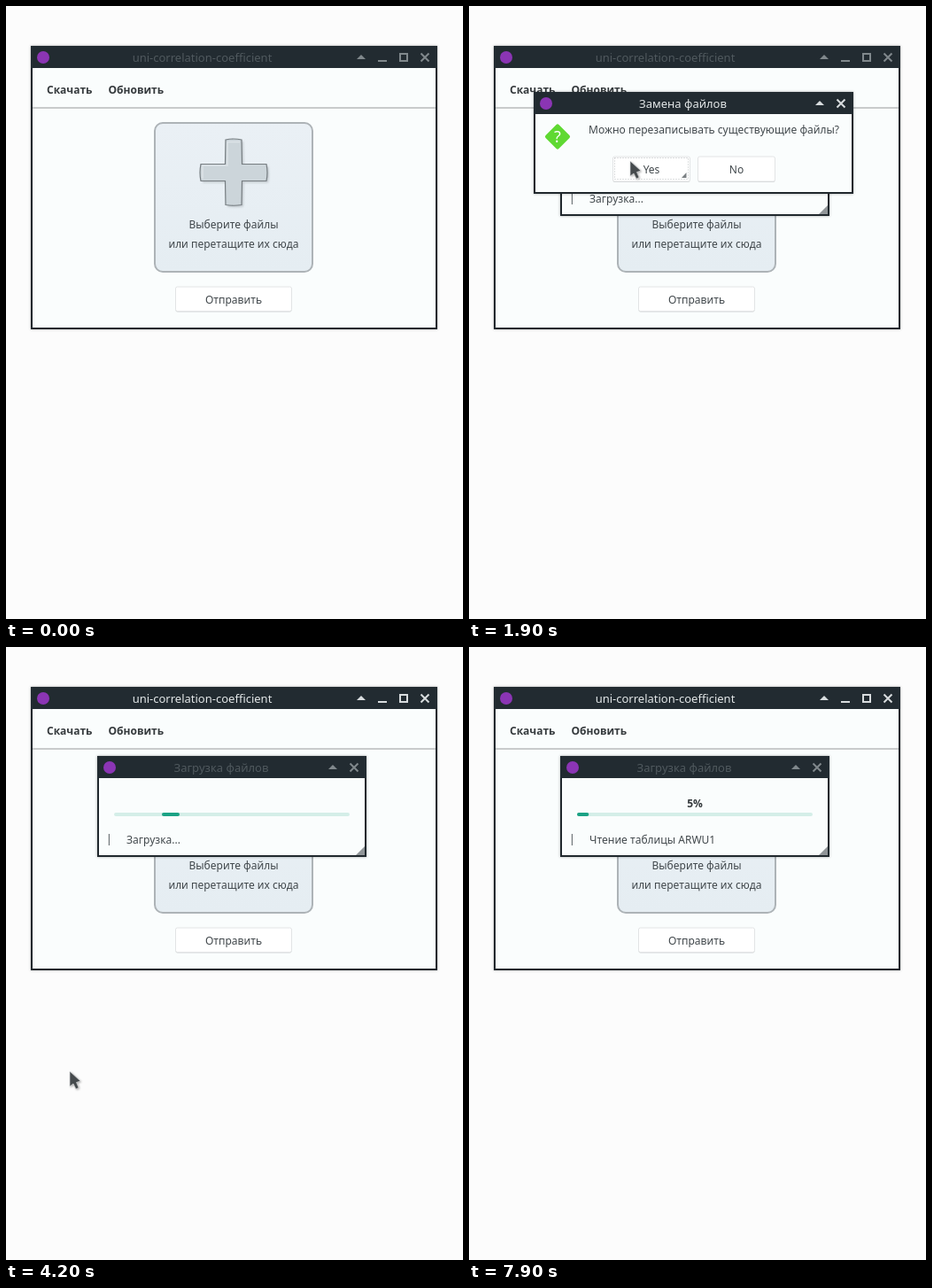
Recreate the animation shown at these times as an HTML page. Size 516 px wide and 692 px high, loop 8 s.

```html
<!DOCTYPE html>
<html lang="ru">
<head>
<meta charset="utf-8">
<title>uni-correlation-coefficient</title>
<style>
  html, body { margin: 0; width: 100%; height: 100%; overflow: hidden; background: #fcfcfc; }
  svg { display: block; }
  text { font: 12px "Noto Sans", sans-serif; fill: #40474b; }
  .title { font-size: 13px; fill: #e3e7e8; text-anchor: middle; }
  .mid { text-anchor: middle; }
  .bold { font-weight: 600; fill: #34393c; }
  .ctl { fill: none; stroke: #d8dcde; stroke-width: 2; }
  .ctl .solid { fill: #d8dcde; stroke: none; }
  .dim .title { fill: #50595e; }
  .dim .ctl { stroke: #80888c; }
  .dim .ctl .solid { fill: #80888c; }
  .win { filter: drop-shadow(0 0 1.5px rgba(0, 0, 0, .35)); }
</style>
</head>
<body>
<svg id="stage" width="516" height="692" viewBox="0 0 516 692"></svg>
<script>
const LOOP = 8000, STEP = 100;
const stage = document.getElementById('stage');

const rect = (x, y, w, h, fill, more = '') =>
  `<rect x="${x}" y="${y}" width="${w}" height="${h}" fill="${fill}" ${more}/>`;
const path = (d, more = '') => `<path d="${d}" ${more}/>`;
const text = (x, y, s, cls = '', more = '') =>
  `<text x="${x}" y="${y}" class="${cls}" ${more}>${s}</text>`;
const icon = (x, y) => `<circle cx="${x}" cy="${y}" r="7" fill="#8b35b4"/>`;
const button = (x, y, w, h) =>
  rect(x + .5, y + 1.5, w, h, '#d3d6d8', 'rx="2"') +
  rect(x + .5, y + .5, w, h, '#fff', 'rx="2" stroke="#e2e4e5"');

const rollUp = (x, y) => path(`M${x - 5} ${y + 2}l5 -5 5 5z`, 'class="solid"');
const close = (x, y) => path(`M${x - 4.5} ${y - 4.5}l9 9m0 -9l-9 9`);

// Frame, title bar and body of a window
function frame(x, y, w, h, title, titleX, controls) {
  return `<g class="frame">${rect(x + 1, y + 1, w - 2, h - 2, 'none', 'stroke="#20282d" stroke-width="2" class="win"')}
    <g class="head">${rect(x, y, w, 25, '#222b31')}</g>
    <g class="body">${rect(x + 2, y + 25, w - 4, h - 27, '#fafdfd')}</g>
    ${icon(x + 14, y + 13)}${text(titleX, y + 18, title, 'title')}
    <g class="ctl">${controls}</g></g>`;
}

function plus() {
  const d = 'M248 151Q257 149 266 151L266.500 178.500L294 178.500Q296 188 294 197.500' +
    'L266.500 197.500L266 224.500Q257 226 248 224.500L247.500 197.500L220 197.500Q218 188 220 178.500L247.500 178.500Z';
  return path(d, 'transform="translate(2 2)" fill="#a8afb4" opacity=".6" filter="url(#soft)"') +
    path(d, 'fill="#ccd5da" stroke="#767d81" stroke-width="1.2"') +
    path('M250 153.500H264M250 153V180H222V195', 'fill="none" stroke="#dde4e8" stroke-width="1.5"');
}

const mainWin = `<g id="main">
  ${frame(28, 45, 459, 320, 'uni-correlation-coefficient', 221.5,
    rollUp(401, 58) + path('M420 62h10M445 54h8v8h-8z') + close(473, 58))}
  ${rect(30, 114, 455, 2, '#c9cbcc')}
  <g id="hover">${button(37, 79, 65, 28)}</g>
  ${text(46, 99, 'Скачать', 'bold')}${text(115.5, 99, 'Обновить', 'bold')}
  ${rect(168, 132, 178, 168, 'url(#drop)', 'rx="9" stroke="#adb3b7" stroke-width="2"')}
  ${plus()}
  ${text(257, 251, 'Выберите файлы', 'mid')}
  ${text(257, 273, 'или перетащите их сюда', 'mid')}
  ${button(191, 316.5, 131, 27.5)}${text(257, 336, 'Отправить', 'mid')}
</g>`;

const loadWin = `<g id="load" class="dim">
  ${frame(103, 123, 304, 114, 'Загрузка файлов', 243, rollUp(369, 136) + close(393, 136))}
  ${text(255, 181, '5%', 'mid bold', 'id="percent"')}
  ${rect(122, 187, 266, 4, '#d4eee8', 'rx="2"')}
  ${rect(176, 187, 20, 4, '#1ba284', 'rx="2" id="chunk"')}
  ${text(113, 221, '|')}${text(136, 222, 'Загрузка...', '', 'id="status"')}
  ${path('M395 235L405 225V235Z', 'fill="#909598"')}
</g>`;

// Half-composited loading window, seen while the dialogs open
const ghost = `<g id="ghost">
  ${rect(103, 123, 304, 25, '#222b31', 'opacity=".4"')}
  <circle cx="117" cy="136" r="7" fill="#d6cbdc"/>
  ${rect(124, 187, 20, 4, '#8fe0da')}
</g>`;

const askWin = `<g id="ask">
  ${frame(73, 97, 361, 115, 'Замена файлов', 241.5, rollUp(396, 110) + close(420, 110))}
  <g id="question">
    ${rect(89.5, 137, 21, 21, '#5fd932', 'rx="2" transform="rotate(45 100 147.500)"')}
    ${text(100, 154, '?', 'mid', 'style="font-size:18px;fill:#fff"')}
    ${text(135, 144, 'Можно перезаписывать существующие файлы?')}
    ${button(162, 169.5, 87, 28)}
    ${rect(164.5, 171.5, 83, 24, 'none', 'stroke="#b9bdbf" stroke-dasharray="1 2"')}
    ${path('M240 194L245.500 188V194Z', 'fill="#7b8083"')}
    ${button(258, 169.5, 87, 28)}
    ${text(206, 189, 'Yes', 'mid')}${text(302, 189, 'No', 'mid')}
  </g>
</g>`;

stage.innerHTML = `<defs>
  <linearGradient id="drop" x2="0" y2="1"><stop stop-color="#eaf0f5"/><stop offset="1" stop-color="#e5edf2"/></linearGradient>
  <filter id="soft"><feGaussianBlur stdDeviation="1.3"/></filter>
  <clipPath id="lower"><rect x="98" y="211" width="314" height="32"/></clipPath>
</defs>${mainWin}${ghost}${loadWin}${askWin}
${path('M0 0V17L4 14L7 20L10 18.500L7.500 12.500L12 11Z',
  'id="cursor" fill="#454a4d" stroke="#dfe1e2" stroke-width=".6" style="filter:drop-shadow(1px 1px 1px rgba(0,0,0,.3))"')}`;

const el = {};
stage.querySelectorAll('[id]').forEach(n => el[n.id] = n);
const askHead = el.ask.querySelector('.head');
const askBody = el.ask.querySelector('.body');

// Pointer path: time, x, y
const track = [
  [300, 15, 190], [500, 38, 130], [700, 68, 95], [1200, 68, 95],
  [1500, 118, 128], [1900, 182, 175], [2300, 182, 175], [2600, 163, 202],
  [3000, 125, 255], [3100, 106, 293], [3300, 88, 395], [3600, 72, 479],
  [4400, 72, 479], [4600, -20, 470]
];

function pointer(t) {
  const i = track.findIndex(k => k[0] > t);
  if (i < 1) return null;
  const [t0, x0, y0] = track[i - 1], [t1, x1, y1] = track[i];
  const p = (t - t0) / (t1 - t0);
  return [x0 + (x1 - x0) * p, y0 + (y1 - y0) * p];
}

const show = (node, on) => { node.style.display = on ? '' : 'none'; };

function draw(now) {
  const t = Math.floor(now % LOOP / STEP) * STEP;
  const opening = t >= 1000 && t < 1200;
  const reading = t >= 7500;

  el.main.classList.toggle('dim', t < 100 || (t >= 1000 && t < 2400));
  show(el.hover, t >= 700 && t < 1200);

  show(el.ghost, opening);
  show(el.load, t >= 1000);
  el.load.setAttribute('clip-path', opening ? 'url(#lower)' : 'none');

  show(el.ask, t >= 1100 && t < 2500);
  show(askBody, !opening);
  show(el.question, !opening);
  askHead.style.opacity = opening ? .77 : 1;
  el.ask.style.opacity = Math.max(0, Math.min(1, (2500 - t) / 200));

  show(el.percent, reading);
  el.chunk.setAttribute('x', reading ? 122 : 176);
  el.chunk.setAttribute('width', reading ? 266 * .05 : 20);
  el.status.textContent = reading ? 'Чтение таблицы ARWU1' : 'Загрузка...';

  const pos = pointer(t);
  show(el.cursor, pos);
  if (pos) el.cursor.setAttribute('transform', `translate(${pos})`);
}

function tick() {
  draw(performance.now());
  requestAnimationFrame(tick);
}
tick();
</script>
</body>
</html>
```
